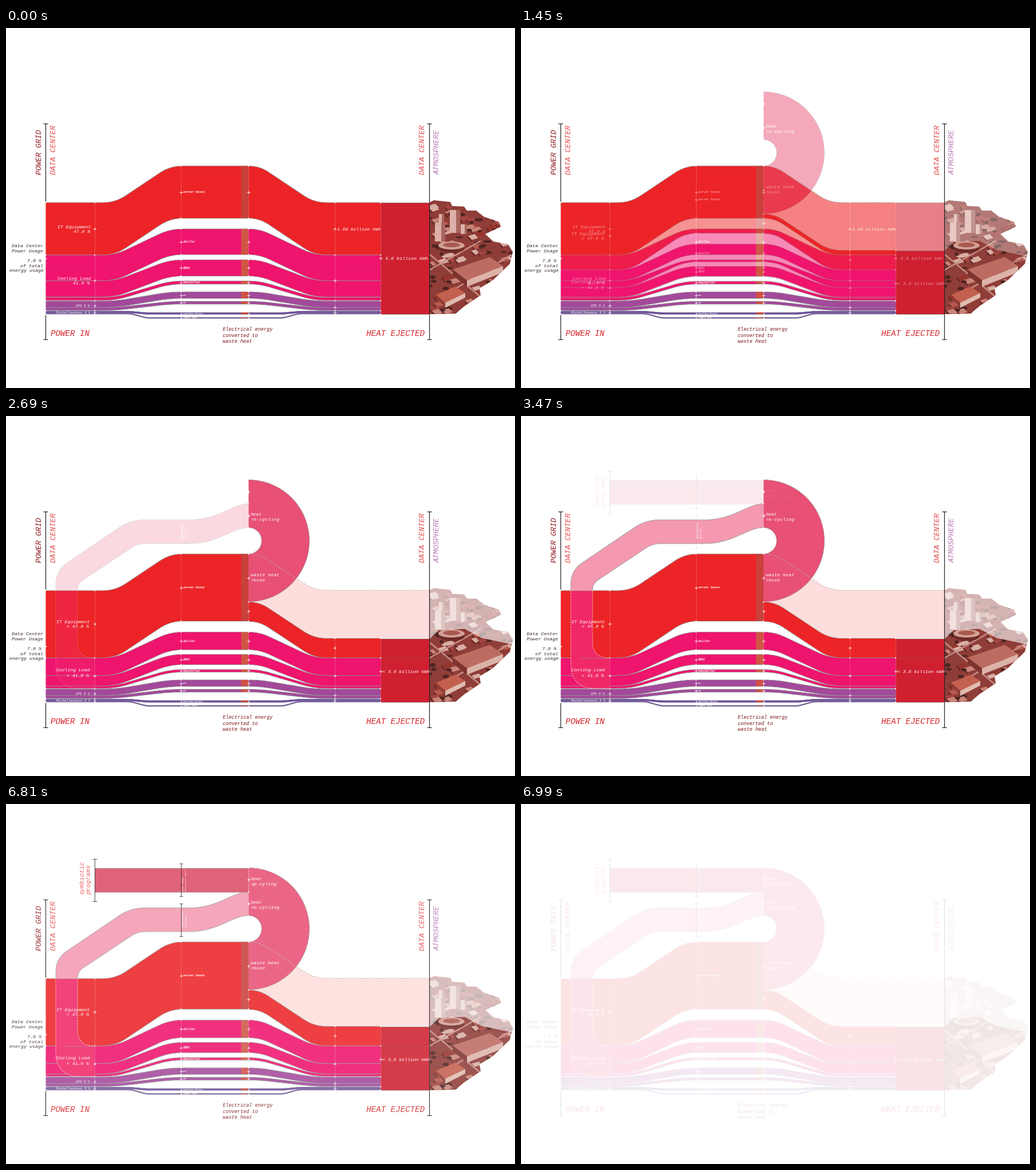
These frames come from a looping animation (890 px wide and 629 px high, 7.02 s). A matplotlib script:

```python
import itertools
import random

import matplotlib.pyplot as plt
import numpy as np
from matplotlib.animation import FuncAnimation
from matplotlib.lines import Line2D
from matplotlib.patches import Circle, Ellipse, Polygon, Rectangle, Wedge

W, H, DPI = 890, 629, 64
PT = 72 / DPI                      # points per pixel
LOOP, STEP = 7020, 20              # ms

RED, PINK, PURPLE, VIOLET = "#ec2427", "#ef146e", "#a3499b", "#6e4ba0"
HEAT, RING, REUSE, UPCYCLE = "#cf2030", "#e85075", "#f499b0", "#da4d66"
PALE, GREY, INK, MAROON = "#fddedc", "#8f9890", "#231f20", "#7a1114"
CORAL, LILAC, TITLE = "#e64b4b", "#b878b4", "#d82026"

fig = plt.figure(figsize=(W / DPI, H / DPI), dpi=DPI, facecolor="white")
ax = fig.add_axes([0, 0, 1, 1])
order = itertools.count(1)


def reset_axes():
    ax.clear()
    ax.set_xlim(0, W)
    ax.set_ylim(H, 0)
    ax.axis("off")


# ---- drawing helpers ----

def put(artist):
    artist.set_zorder(next(order))
    ax.add_artist(artist)
    return artist


def shape(pts, color, **kw):
    return put(Polygon(pts, closed=True, fc=color, lw=0, **kw))


def rect(x0, y0, x1, y1, color, **kw):
    return put(Rectangle((x0, y0), x1 - x0, y1 - y0, fc=color, lw=0, **kw))


def line(pts, color=GREY, lw=0.8, **kw):
    xs, ys = zip(*pts)
    return put(Line2D(xs, ys, color=color, lw=lw * PT,
                      solid_capstyle="butt", **kw))


def text(x, y, s, size, color="white", ha="left", rot=0, weight="normal"):
    ax.text(x, y, s, size=size * PT, color=color, ha=ha, va="baseline",
            rotation=rot, rotation_mode="anchor", family="Liberation Mono",
            style="italic", weight=weight, zorder=next(order))


def cross(x, y, s=2.8):
    line([(x - s, y), (x + s, y)], "white", 0.8)
    line([(x, y - s), (x, y + s)], "white", 0.8)


def dot(x, y):
    put(Circle((x, y), 1.1, fc="white", lw=0))


def beam(x, y0, y1, lw=1.2, cap=4, ends=(True, True), color=INK):
    line([(x, y0), (x, y1)], color, lw)
    for y, on in zip((y0, y1), ends):
        if on:
            line([(x - cap, y), (x + cap, y)], color, lw)


def rounded(pts, r=22):
    """Polyline with its corners replaced by quadratic curves."""
    pts = np.array(pts, float)
    t = np.linspace(0, 1, 14)[:, None]
    out = [pts[:1]]
    for a, b, c in zip(pts, pts[1:], pts[2:]):
        la, lc = np.hypot(*(a - b)), np.hypot(*(c - b))
        k = min(r, la, lc)
        p, q = b + (a - b) * k / la, b + (c - b) * k / lc
        out.append((1 - t) ** 2 * p + 2 * t * (1 - t) * b + t ** 2 * q)
    out.append(pts[-1:])
    return np.vstack(out)


def bezier(p0, p1, p2, p3):
    t = np.linspace(0, 1, 24)[:, None]
    p0, p1, p2, p3 = map(np.array, (p0, p1, p2, p3))
    return ((1 - t) ** 3 * p0 + 3 * t * (1 - t) ** 2 * p1
            + 3 * t ** 2 * (1 - t) * p2 + t ** 3 * p3)


def ribbon(top, bottom, color, lw=0.8):
    shape(np.vstack([top, bottom[::-1]]), color)
    line(top, lw=lw)
    line(bottom, lw=lw)


def flow(side, outer, inner, h, color, bends=(191, 287), r=22, lw=0.8):
    """Band between an outer level and the level at the centre."""
    def edge(dy):
        a, b = outer + dy, inner + dy
        if side == "left":
            return rounded([(69.5, a), (bends[0], a), (bends[1], b), (424, b)], r)
        return rounded([(424, b), (730 - bends[1], b), (730 - bends[0], a),
                        (655, a)], r)
    ribbon(edge(0), edge(h), color, lw)


# ---- city: flat shapes in red tones ----

COAST = [(740, 305), (748, 301), (777, 304), (780, 311), (801, 312), (806, 319),
         (822, 319), (836, 330), (862, 339), (865, 347), (838, 360), (852, 373),
         (878, 378), (886, 391), (881, 412), (852, 440), (828, 455), (830, 467),
         (803, 485), (786, 499), (740, 500)]


def city(faded):
    rng = random.Random(8)
    coast = shape(COAST, "#8f3d38")

    def clipped(patch):
        patch.set_clip_path(coast)

    roofs = ["#b8574d", "#a5443f", "#c98578", "#d9aea4", "#96352f"]
    for y in sorted(rng.uniform(308, 500) for _ in range(130)):
        x, w, h = rng.uniform(738, 884), rng.uniform(6, 16), rng.uniform(3, 7)
        if rng.random() < 0.35:
            clipped(put(Ellipse((x, y), w, h, fc="#4f2421", lw=0)))
            continue
        s = w * 0.3
        clipped(shape([(x, y), (x + w, y - s), (x + w + h, y + h - s),
                       (x + h, y + h)], rng.choice(roofs)))
        clipped(shape([(x, y), (x + h, y + h), (x + h, y + h + 4), (x, y + 4)],
                      "#6b2a27"))
    # streets
    for a, b in (((740, 423), (830, 372)), ((740, 395), (830, 470)),
                 ((775, 462), (884, 396))):
        clipped(line([a, b], "#c78f86", 2.5))
    # towers
    for x, y, w, h in ((776, 318, 18, 40), (750, 340, 18, 33),
                       (795, 343, 11, 17), (757, 325, 9, 15)):
        clipped(rect(x, y, x + w * 0.6, y + h, "#dcb0a8"))
        clipped(rect(x + w * 0.6, y, x + w, y + h, "#a8665f"))
    # domed hall
    clipped(put(Ellipse((779, 385), 46, 16, fc="#6f2b27", lw=0)))
    clipped(put(Ellipse((779, 380), 46, 14, fc="#d2a196", lw=0)))
    clipped(put(Ellipse((779, 379), 30, 8, fc="#a9584f", lw=0)))
    # long hall
    clipped(shape([(781, 422), (846, 400), (869, 416), (806, 441)], "#bd6c61"))
    clipped(shape([(781, 422), (806, 441), (806, 452), (781, 432)], "#7d332e"))
    clipped(shape([(806, 441), (869, 416), (869, 427), (806, 452)], "#dcb3a9"))
    # low block
    clipped(shape([(752, 466), (786, 452), (803, 463), (768, 480)], "#c4604f"))
    clipped(shape([(768, 480), (803, 463), (803, 471), (768, 489)], "#e0bbb0"))
    if faded:
        clipped(shape([(735, 295), (890, 295), (890, 400), (832, 388),
                       (802, 372), (757, 374), (740, 390)], "white", alpha=0.62))


# ---- parts of the diagram ----

def rows(reuse):
    """outer top, inner top, height, colour, strip, label, label size"""
    if reuse:
        load = [(305, 241, 117.5), (422.5, 377.5, 31), (453.5, 416.5, 18),
                (471.5, 443, 4.5)]
    else:
        load = [(305, 241, 91.5), (396.5, 351, 45), (441.5, 405, 28.5),
                (470.5, 442, 5.5)]
    load += [(477, 461, 11.5), (488.5, 477.5, 5), (494.5, 497, 3.5),
             (498, 505.5, 2)]
    look = [(RED, "#c9403c", "server boxes", 5.1),
            (PINK, "#cf5645", "chiller", 5.1),
            (PINK, "#cf5645", "CRAC", 5.1),
            (PINK, "#cf5645", "humidifier", 5.1),
            (PURPLE, "#d05046", "UPS", 3.3),
            (PURPLE, "#d05046", "PDU", 3.3),
            (VIOLET, "#cd463c", "auxiliary devices", 3.3),
            (VIOLET, "#cd463c", "lights, misc", 3.3)]
    return [a + b for a, b in zip(load, look)]


def sankey(reuse):
    table = rows(reuse)
    for i, (outer, inner, h, color, strip, _, _) in enumerate(table):
        kw = dict(bends=(218, 245), r=6, lw=0.5) if i > 5 else {}
        flow("left", outer, inner, h, color, **kw)
        if i == 0 and reuse:
            flow("right", 388.5, 325, 34, color)
        else:
            flow("right", outer, inner, h, color, **kw)
        rect(411, inner + 0.4, 424, inner + h - 0.4, strip)
    top = 388.5 if reuse else 305
    rect(655, top, 740, 500, HEAT)
    line([(655, top), (740, top)])
    line([(655, 500), (740, 500)])
    if reuse:
        line([(655, 422.5), (740, 422.5)], "#a34a4a", 0.6)

    dots = dict(ls=(0, (1, 1.6)), alpha=0.7)
    for x, y0 in ((155, 305), (575, top), (655, top)):
        line([(x, y0), (x, 500)], "white", 0.7, **dots)
    for outer, inner, h, *_ in table:
        for x in (306, 424):
            line([(x, inner), (x, inner + h)], "white", 0.7, **dots)
            if h > 8:
                dot(x, inner)
                dot(x, inner + h)
    split = 422.5 if reuse else 396.5
    for x in (69.5, 155, 575, 655):
        for y in (top if x > 400 else 305, split, 476.5, 494, 500):
            dot(x, y)


def marks(reuse):
    for i, (_, inner, h, _, _, label, size) in enumerate(rows(reuse)):
        mid, s = inner + h / 2, 2.8 if i < 6 else 1.5
        cross(306, mid, s)
        cross(424, 341 if reuse and i == 0 else mid, s)
        text(309.5, mid + size * 0.3, label, size, weight="bold")
    it, cool = (363, 453.5) if reuse else (350.5, 441)
    for x, ys in ((155, (it, cool, 485, 497)),
                  (575, (405 if reuse else it, cool, 488, 497)),
                  (655, (446 if reuse else 402,))):
        for y in ys:
            cross(x, y)
    cross(69.5, 402, 1.5)

    if reuse:
        left = [(147, 361.5, "IT Equipment"), (145, 370, "> 47.0 %"),
                (147, 446.5, "Cooling Load"), (145, 456, "< 41.0 %")]
        text(658, 449, "< 3.6 billion kWh", 8.1)
    else:
        left = [(148, 349.5, "IT Equipment"), (147, 358, "47.0 %"),
                (148, 440, "Cooling Load"), (146, 448.5, "41.0 %")]
        text(663, 405, "3.6 billion kWh", 8.3)
        text(579, 353.5, "1.69 billion kWh", 7.9)
    for x, y, s in left:
        text(x, y, s, 8.1, ha="right")
    text(147, 487, "UPS 9 %", 5.7, ha="right")
    text(147, 499, "Michelleneous 3 %", 5.8, ha="right")


def captions():
    for x, y, s in ((65, 383, "Data Center"), (65, 391.5, "Power Usage"),
                    (62, 409, "7.0 %"), (65, 417.5, "of total"),
                    (66, 426, "energy usage")):
        text(x, y, s, 8.2, "#332424", ha="right")
    text(78, 537.5, "POWER IN", 14.3, TITLE)
    text(732, 537.5, "HEAT EJECTED", 14.3, TITLE, ha="right")
    for y, s in ((529, "Electrical energy"), (540, "converted to"),
                 (550, "waste heat")):
        text(379, y, s, 8.5, MAROON)
    for x, s, color in ((61.5, "POWER GRID", "#8c1419"),
                        (87, "DATA CENTER", CORAL),
                        (731.5, "DATA CENTER", CORAL),
                        (758, "ATMOSPHERE", LILAC)):
        text(x, 256.5, s, 13.1, color, rot=90)


def reuse_back():
    top = rounded([(424, 241), (443, 241), (539, 304.5), (740, 304.5)])
    low = rounded([(424, 325), (443, 325), (539, 388.5), (740, 388.5)])
    shape(np.vstack([top, low[::-1]]), PALE)
    return top


def ring(guide):
    put(Wedge((424, 218), 106.5, -90, 90, width=83.5, fc=RING, lw=0))
    t = np.linspace(-np.pi / 2, np.pi / 2, 60)
    for r in (106.5, 23):
        line(np.c_[424 + r * np.cos(t), 218 + r * np.sin(t)], lw=0.6)
    line(guide, "#bdb0ae", 0.9, dashes=(4, 2.5))
    for y in (132, 174, 283):
        cross(424, y)
    for y in (153.5, 195, 241, 325):
        dot(424, y)
    line([(424, 112), (424, 195)], "white", 0.7, ls=(0, (1, 1.6)), alpha=0.7)
    for y, s in ((174, "heat"), (183, "re-cycling"),
                 (280, "waste heat"), (289, "reuse")):
        text(428, y, s, 8.2)


def recycling():
    def edge(y, bend, x, yx, r):
        curve = bezier((424, y), (395, y), (372, y + 28), (320, y + 28))
        tail = rounded([(320, y + 28), (bend, y + 28), (x, yx), (x, 305)], r)
        return np.vstack([curve, tail])

    ribbon(edge(153.5, 218, 87, 270, 24), edge(195, 230, 125, 293, 14), REUSE)
    outer = rounded([(87, 305), (87, 476), (155, 476)], 43)
    inner = rounded([(125, 305), (125, 422.5), (155, 422.5)], 28)
    shape(np.vstack([outer, inner[::-1]]), "#f02868")
    line([(87, 305), (125, 305)], lw=0.6)
    line([(125, 422.5), (155, 422.5)], lw=0.6)
    line([(103, 422.5), (125, 422.5)], lw=0.6)
    for path in (outer, inner):
        line(path, "#f6d9d9", 0.9, dashes=(3, 2))
    line([(306, 181), (306, 223)], "white", 0.7, ls=(0, (1, 1.6)), alpha=0.7)
    cross(424, 174)
    for x, s in ((311, "absorption"), (316.5, "chiller")):
        text(x, 213.5, s, 4.9, rot=90)


def upcycling():
    rect(155, 111.5, 424, 153.5, UPCYCLE)
    for y in (111.5, 153.5):
        line([(155, y), (424, y)], lw=0.7)
        dot(424, y)
    line([(424, 112), (424, 153)], "white", 0.7, ls=(0, (1, 1.6)), alpha=0.7)
    cross(424, 132)
    beam(155, 95.5, 169.5, 0.9)
    beam(306, 104, 160.5, 0.9, 3)
    beam(306, 174, 230.5, 0.9, 3)
    for x, s in ((136, "symbiotic"), (148, "programs")):
        text(x, 158, s, 10.7, CORAL, rot=90)
    for x, s in ((311, "heat pump/"), (315.5, "desiccant wheel")):
        text(x, 152, s, 4.4, rot=90)
    for y, s in ((133, "heat"), (142, "up-cyling")):
        text(428, y, s, 8.2)


def render(stage):
    """Picture of the diagram: 0 base, 1 reuse, 2 recycling, 3 upcycling."""
    reset_axes()
    reuse = stage > 0
    beam(69, 167, 303, ends=(True, False))
    beam(69, 501, 544, ends=(False, True))
    if reuse:
        guide = reuse_back()
    city(reuse)
    beam(740, 167, 544)
    sankey(reuse)
    if reuse:
        ring(guide)
    if stage > 1:
        recycling()
    if stage > 2:
        upcycling()
    marks(reuse)
    captions()
    fig.canvas.draw()
    return np.array(fig.canvas.buffer_rgba())[..., :3].astype(np.float32)


# ---- timeline: each scene dissolves into the next in 30 ms steps ----

scenes = [render(i) for i in range(4)]
scenes.append(np.full_like(scenes[0], 255))
STARTS = (1360, 2630, 3470, 6810)


def picture(t):
    done = sum(t >= s for s in STARTS)
    if done == 0:
        return scenes[0]
    mix = min(1, ((t - STARTS[done - 1]) // 30 + 1) / 8)
    if mix == 1:
        return scenes[done]
    return scenes[done - 1] * (1 - mix) + scenes[done] * mix


def as_bytes(img):
    return (img + 0.5).astype(np.uint8)


reset_axes()
view = ax.imshow(as_bytes(scenes[0]), extent=(0, W, H, 0), aspect="auto",
                 interpolation="nearest")


def update(i):
    view.set_data(as_bytes(picture(i * STEP + STEP // 2)))
    return [view]


anim = FuncAnimation(fig, update, frames=LOOP // STEP, interval=STEP,
                     repeat=True, cache_frame_data=False)
plt.show()
```
